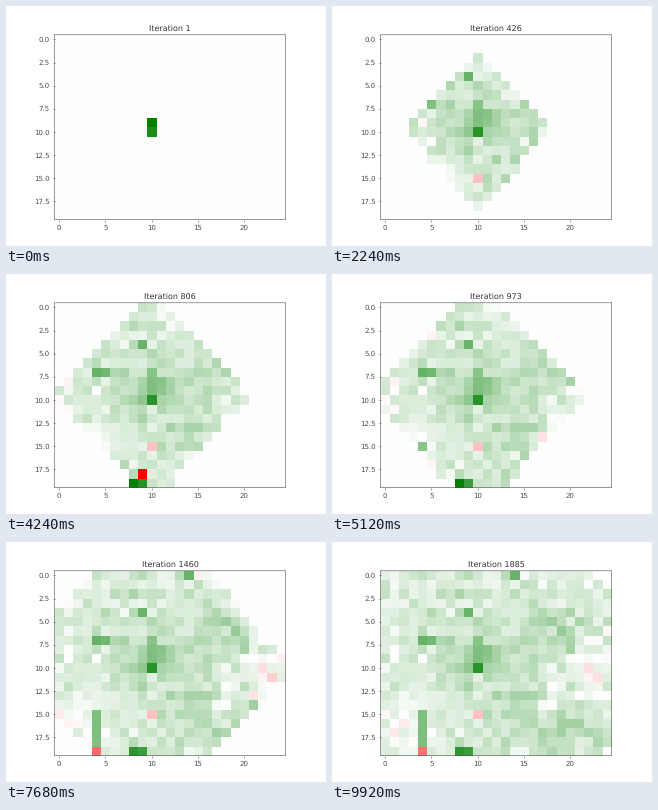
Recreate the animation shown at these times as a matplotlib script. Size 320 by 240 pixels, loop 10 s.

```python
import numpy as np
import matplotlib.pyplot as plt
from matplotlib.animation import FuncAnimation
from matplotlib.colors import LinearSegmentedColormap

ROWS, COLS = 20, 25
CENTER = (10, 10)  # (column, row)
FRAMES, INTERVAL = 125, 80

# Broad bumps and dips of the value field: column, row, width, height, amount
HILLS = [
    (10, 9, 2.6, 2.2, 0.26),
    (17.5, 6, 3.5, 2.5, 0.13),
    (14.5, 13, 3, 3, 0.1),
    (20.5, 16.5, 2.5, 1.5, 0.17),
    (22.5, 10, 2.5, 3, -0.2),
    (1.5, 16.5, 4, 3, -0.14),
]

# Outstanding cells: (column, row): (first estimate, settled value)
PEAKS = {
    (10, 10): (0.9, 0.84),
    (10, 9): (1, 0.5),
    (5, 9): (1, 0.2),
    (9, 18): (-1, 0.15),
    (10, 15): (-0.25, -0.24),
    (10, 16): (-0.34, 0.1),
    (8, 19): (1, 0.82),
    (9, 19): (0.85, 0.76),
    (3, 16): (-0.52, 0.05),
    (3, 19): (0.85, 0.05),
    (4, 19): (-0.58, -0.56),
    (9, 4): (0.6, 0.58),
    (4, 7): (0.6, 0.6),
    (5, 7): (0.5, 0.55),
    (14, 0): (0.6, 0.58),
    (23, 0): (0.6, 0.62),
}


def search():
    """Breadth-first search, one checked edge per iteration.

    Returns the iterations of the first and the last visit of each cell."""
    found = np.full((ROWS, COLS), -1)
    last = np.zeros((ROWS, COLS), int)
    found[CENTER[1], CENTER[0]] = 0
    queue, step = [CENTER], 0
    for c, r in queue:
        for dc, dr in ((0, -1), (0, 1), (-1, 0), (1, 0)):
            x, y = c + dc, r + dr
            if not (0 <= x < COLS and 0 <= y < ROWS):
                continue
            step += 1
            last[y, x] = step
            if found[y, x] < 0:
                found[y, x] = step
                queue.append((x, y))
    return found, last


def estimates():
    rng = np.random.default_rng(5)
    r, c = np.mgrid[:ROWS, :COLS]
    settled = 0.16 + rng.normal(0, 0.07, (ROWS, COLS))
    for x, y, w, h, amount in HILLS:
        settled += amount * np.exp(-((c - x) / w) ** 2 - ((r - y) / h) ** 2)
    settled[15:19, 4] = 0.5
    first = settled + rng.normal(-0.02, 0.05, (ROWS, COLS))
    for (x, y), pair in PEAKS.items():
        first[y, x], settled[y, x] = pair
    return first, settled


found, last = search()
first, settled = estimates()


def values(step):
    seen = np.where(step < last, first, settled)
    return np.where(step < found, 0, seen)


plt.rcParams.update({
    "text.hinting": "no_hinting",
    "text.hinting_factor": 1,
    "axes.titlecolor": "0.2",
    "axes.edgecolor": "0.3",
    "xtick.color": "0.3",
    "ytick.color": "0.3",
})
fig, ax = plt.subplots(figsize=(6.4, 4.8), dpi=50)
cmap = LinearSegmentedColormap.from_list("signed", ["red", "white", "green"])
image = ax.imshow(values(1), cmap=cmap, vmin=-1, vmax=1, interpolation="nearest")
for spine in ax.spines.values():
    spine.set_snap(False)
title = ax.set_title("Iteration 1")


def update(i):
    step = 1 + 76 * i // 5
    image.set_data(values(step))
    title.set_text(f"Iteration {step}")
    return image, title


anim = FuncAnimation(fig, update, frames=FRAMES, interval=INTERVAL,
                     repeat=True, repeat_delay=0)
plt.show()
```
